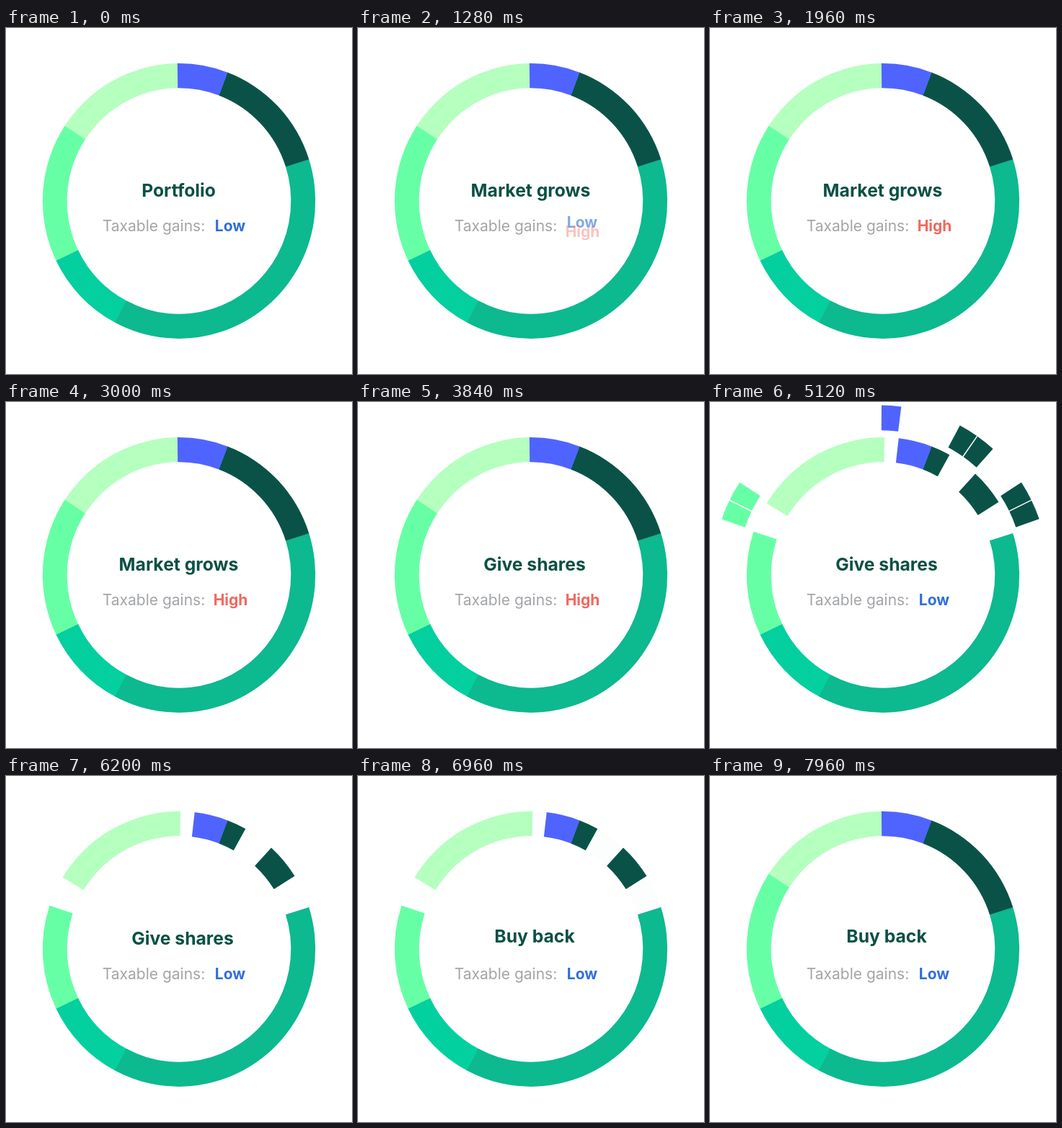
These frames come from a looping animation (480 px wide and 480 px high, 8000 ms). An HTML page with a canvas:

```html
<!DOCTYPE html>
<html lang="en">
<head>
<meta charset="utf-8">
<title>Portfolio ring</title>
<style>
  html, body { margin: 0; width: 100%; height: 100%; overflow: hidden; background: #fff; }
  canvas { display: block; width: 480px; height: 480px; }
</style>
</head>
<body>
<canvas id="stage"></canvas>
<script>
const LOOP = 8000, STEP = 40;
const BLUE = '#4f64ff', DARK = '#0a5248', GREEN = '#0db98f';
const TEAL = '#03cf9f', BRIGHT = '#67ffa6', PALE = '#b5ffbf';
const FONT = 'Inter, Roboto, sans-serif';

// Slices as [color, start, end], in degrees clockwise from the top
const fullRing = [
  [PALE, 301.4, 360.6], [GREEN, 72.3, 208.2], [TEAL, 208, 244.4],
  [BRIGHT, 244.3, 303.1], [DARK, 20.8, 72.4], [BLUE, -0.65, 20.9]
];
const openRing = [
  [PALE, 301.4, 360.6], [GREEN, 72.3, 208.2], [TEAL, 208, 244.4],
  [BRIGHT, 244.3, 288.4], [DARK, 20.8, 29.2], [DARK, 42.6, 58], [BLUE, 6.6, 20.9]
];
// Given shares: in the ring, then outside it; pairs have a hairline between them
const shares = [
  { color: BLUE, from: [-0.65, 6.6], to: [0.36, 7.1] },
  { color: DARK, from: [29.2, 42.6], to: [28.2, 42], pair: true },
  { color: DARK, from: [58, 72.4], to: [56.9, 70.7], pair: true },
  { color: BRIGHT, from: [288.4, 303.1], to: [289.2, 303.1], pair: true }
];

// Each label: text, center x, baseline, color, time it begins to replace the last one
const titles = [
  ['Portfolio', 239.5, 234], ['Market grows', 239.5, 234, 680],
  ['Give shares', 245, 234, 3320], ['Buy back', 245, 231, 6500]
].map(([text, x, y, at]) => ({ text, x, y, at, color: '#0a5045', size: 24.7 }));
const levels = [
  ['Low', 311, '#2f6fdb'], ['High', 311.5, '#f2685c', 1095], ['Low', 311, '#2f6fdb', 4200]
].map(([text, x, color, at]) => ({ text, x, y: 282, at, color, size: 21 }));

const canvas = document.getElementById('stage');
const ctx = canvas.getContext('2d');
const ratio = window.devicePixelRatio || 1;
canvas.width = canvas.height = 480 * ratio;

const mix = (a, b, p) => a + (b - a) * p;
const progress = (t, start, length) => Math.min(1, Math.max(0, (t - start) / length));
const ease = p => p < 0.5 ? 4 * p ** 3 : 1 - 4 * (1 - p) ** 3;
const radians = degrees => (degrees - 90) * Math.PI / 180;

// The ring is slightly taller than it is wide
function inRingSpace(x, draw) {
  ctx.save();
  ctx.translate(x, 240);
  ctx.scale(1, 1.009);
  draw();
  ctx.restore();
}

function slice(color, start, end, inner, outer) {
  ctx.fillStyle = color;
  ctx.beginPath();
  ctx.arc(0, 0, outer, radians(start), radians(end));
  ctx.arc(0, 0, inner, radians(end), radians(start), true);
  ctx.fill();
}

function drawRing(slices, alpha) {
  ctx.globalAlpha = alpha;
  inRingSpace(240, () => slices.forEach(s => slice(...s, 155.3, 189.2)));
  ctx.globalAlpha = 1;
}

function drawShares(out, alpha) {
  const inner = mix(155.3, 199, out), outer = mix(189.2, 233.3, out);
  inRingSpace(mix(240, 236.5, out), () => {
    for (const { color, from, to, pair } of shares) {
      const start = mix(from[0], to[0], out), end = mix(from[1], to[1], out);
      ctx.globalAlpha = alpha;
      slice(color, start, end, inner, outer);
      if (!pair) continue;
      const middle = radians((start + end) / 2);
      ctx.globalAlpha = alpha * out;
      ctx.strokeStyle = '#fff';
      ctx.lineWidth = 1.5;
      ctx.beginPath();
      ctx.moveTo(inner * Math.cos(middle), inner * Math.sin(middle));
      ctx.lineTo(outer * Math.cos(middle), outer * Math.sin(middle));
      ctx.stroke();
    }
  });
  ctx.globalAlpha = 1;
}

function drawText({ text, x, y, color, size }, weight, shift, alpha) {
  ctx.globalAlpha = alpha;
  ctx.font = `${weight} ${size}px ${FONT}`;
  ctx.fillStyle = color;
  ctx.fillText(text, x, y + shift);
  ctx.globalAlpha = 1;
}

// Labels rise into place while the one before rises away
function drawLabels(labels, t) {
  const arrival = label => label ? label.at === undefined ? 1 : ease(progress(t, label.at, 400)) : 0;
  labels.forEach((label, i) => {
    const enter = arrival(label), leave = arrival(labels[i + 1]);
    const alpha = enter * (1 - leave);
    if (alpha > 0) drawText(label, 700, 13 * (1 - enter - leave), alpha);
  });
}

function draw(t) {
  ctx.setTransform(ratio, 0, 0, ratio, 0, 0);
  ctx.fillStyle = '#fff';
  ctx.fillRect(0, 0, 480, 480);

  const out = ease(progress(t, 3840, 520));
  const fade = 1 - progress(t, 5400, 320);
  const refill = ease(progress(t, 6900, 400));
  if (out === 0 || refill === 1) {
    drawRing(fullRing, 1);
  } else {
    drawRing(openRing, 1);
    if (fade > 0) drawShares(out, fade);
    if (refill > 0) drawRing(fullRing, refill);
  }

  ctx.textAlign = 'center';
  drawLabels(titles, t);
  drawText({ text: 'Taxable gains:', x: 205, y: 282, color: '#a2a5a8', size: 21 }, 400, 0, 1);
  drawLabels(levels, t);
}

const began = performance.now();
function tick() {
  const t = (performance.now() - began) % LOOP;
  draw(Math.floor(t / STEP) * STEP);
  requestAnimationFrame(tick);
}
tick();
</script>
</body>
</html>
```
